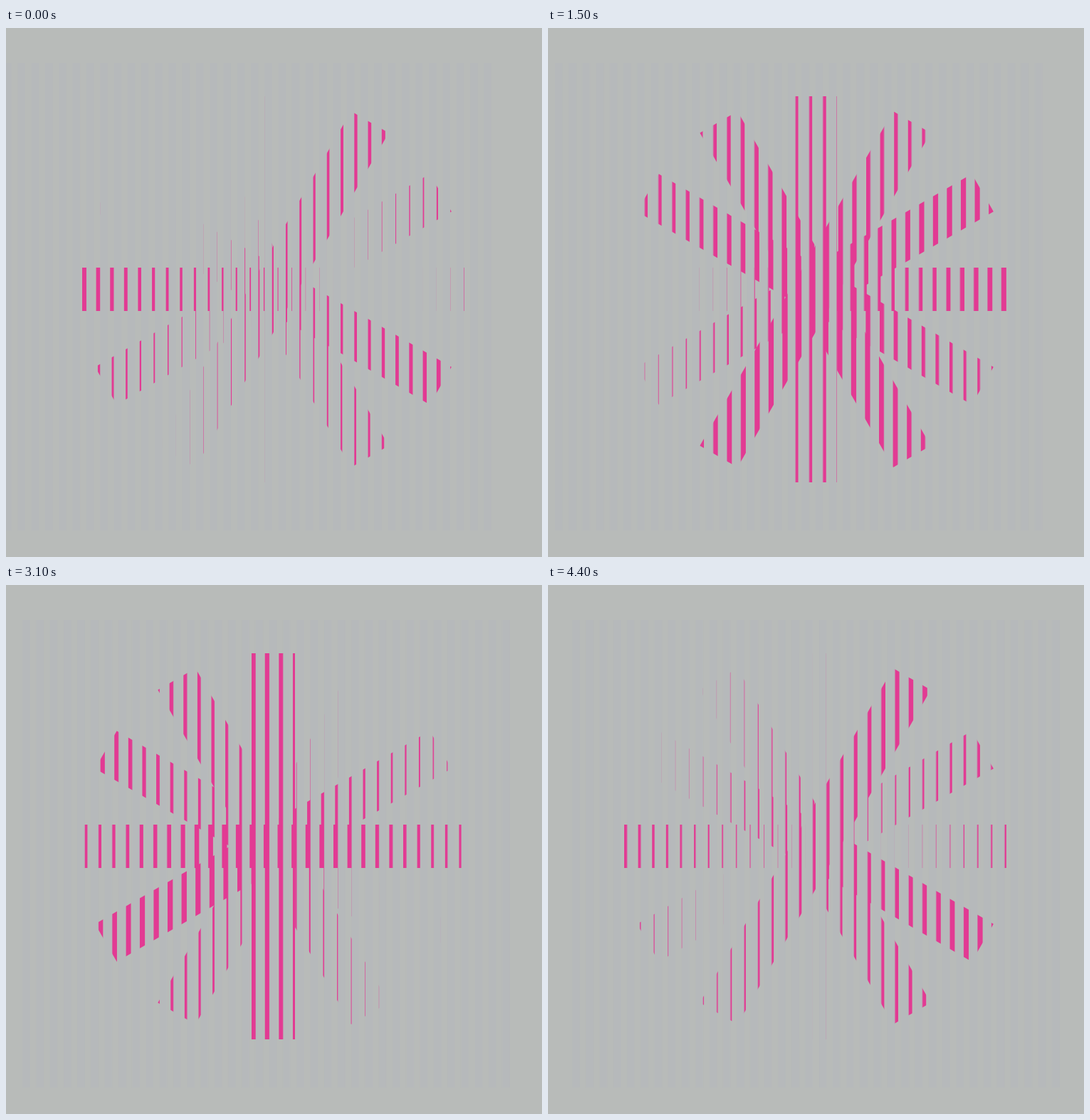
Write an HTML page that moves like this. It is 753 px wide and 744 px high and loops after 4500 ms.

```html
<!DOCTYPE html>
<html lang="en">
<head>
<meta charset="utf-8">
<title>Striped star behind a sliding grid</title>
<style>
  html, body {
    margin: 0;
    width: 100%;
    height: 100%;
    overflow: hidden;
    background: #b8bbb9;
  }
  svg { display: block; width: 753px; height: 744px; }
  #star { fill: #e23a93; }
  #grid { fill: #b6b9bb; animation: slide 4.5s steps(45) infinite; }
  @keyframes slide { to { transform: translateX(37.5px); } }
</style>
</head>
<body>
<svg viewBox="0 0 753 744">
  <defs id="clips"></defs>
  <g id="star"></g>
  <path id="grid"/>
</svg>
<script>
  const NS = 'http://www.w3.org/2000/svg';
  const $ = id => document.getElementById(id);

  function add(parent, tag, attrs) {
    const el = document.createElementNS(NS, tag);
    for (const key in attrs) el.setAttribute(key, attrs[key]);
    return parent.appendChild(el);
  }

  // Path of equal upright bars at a fixed pitch
  function bars(x, width, pitch, count, top, bottom) {
    let d = '';
    for (let i = 0; i < count; i++) {
      d += `M${(x + i * pitch).toFixed(3)} ${top}h${width}V${bottom}h${-width}z`;
    }
    return d;
  }

  const CX = 375.5, CY = 367.5, LENGTH = 543, THICK = 61;

  // Each arm: rotation in degrees and the start of its first stripe
  const arms = [[0, 107], [-30, 109.3], [-60, 113.6], [90, 108.8], [60, 112], [30, 113]];

  arms.forEach(([angle, start], n) => {
    const clip = add($('clips'), 'clipPath', { id: 'arm' + n });
    add(clip, 'rect', {
      x: CX - LENGTH / 2, y: CY - THICK / 2, width: LENGTH, height: THICK,
      transform: `rotate(${angle} ${CX} ${CY})`
    });
    add($('star'), 'path', {
      d: bars(start, 7.4, 19.61, 28, 80, 660),
      'clip-path': `url(#arm${n})`
    });
  });

  // The grid is slightly finer than the stripes, which makes the arms open and close
  $('grid').setAttribute('d', bars(-2.61, 10.41, 19.26, 36, 49, 707));
</script>
</body>
</html>
```
